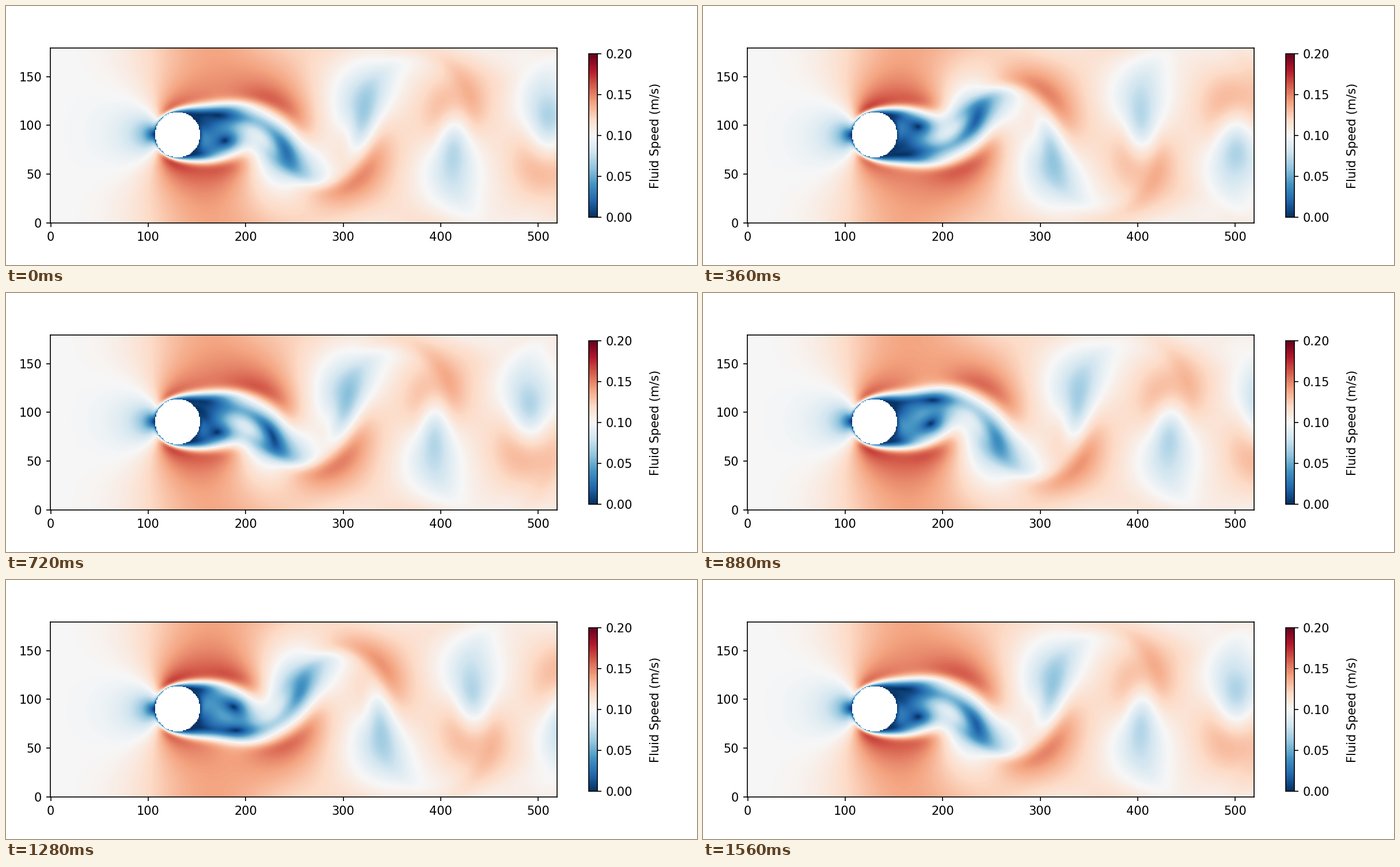
Recreate the animation shown at these times as a matplotlib script. Size 1200 by 450 pixels, loop 1.6 s.

```python
import numpy as np
import matplotlib.pyplot as plt
from matplotlib.animation import FuncAnimation

# Flow past a cylinder, solved with a regularised D2Q9 lattice Boltzmann scheme.
# The tunnel is periodic in y and runs on past the visible part.
WIDTH, HEIGHT, LENGTH = 520, 180, 600
CX, CY, RADIUS = 130, 90, 22.5
U0, VISCOSITY = 0.1, 1 / 30
INFLOW = 1.035 * U0          # offsets the back pressure of the cylinder
FRAMES, PERIOD, SUB = 40, 20, 4

DIRS = np.array([(0, 0), (1, 0), (-1, 0), (0, 1), (0, -1),
                 (1, 1), (-1, -1), (1, -1), (-1, 1)])
OPPOSITE = np.array([0, 2, 1, 4, 3, 6, 5, 8, 7])
# Moments: rho, jx, jy, sxx, syy, sxy
INLET = np.array([1, INFLOW, 0, INFLOW**2, 0, 0], np.float32)[:, None]


def cubic_weights(n_out, n_in, lift=0):
    x = (np.arange(n_out) + 0.5 - lift) * n_in / n_out - 0.5
    d = np.abs(x[:, None] - np.arange(n_in))
    near = 1.5 * d**3 - 2.5 * d**2 + 1
    far = -0.5 * d**3 + 2.5 * d**2 - 4 * d + 2
    w = np.where(d < 1, near, np.where(d < 2, far, 0))
    return w / w.sum(axis=1, keepdims=True)


def resample(field, ny, nx, lift=0):
    rows, cols = field.shape[-2:]
    return cubic_weights(ny, rows, lift) @ field @ cubic_weights(nx, cols).T


class Tunnel:
    def __init__(self, scale, fields):
        self.scale = scale
        nx, ny = int(LENGTH * scale) + 2, int(HEIGHT * scale) + 2
        n, pad = nx * ny, nx + 2
        self.omega = 1 / (0.5 + 3 * VISCOSITY * scale)

        x = (np.arange(nx) - 0.5) / scale - 0.5
        y = (np.arange(ny) - 0.5) / scale - 0.5
        solid = (x - CX)**2 + (y[:, None] - (HEIGHT - 1) / 2)**2 < RADIUS**2
        self.fluid = ~solid[1:-1, 1:-1]

        # Writing at an offset makes streaming free.
        shift = DIRS[:, 1] * nx + DIRS[:, 0]
        row = n + 2 * pad
        pops = np.zeros((9, row), np.float32)
        self.flat = pops.reshape(-1)
        self.read = [p[pad:pad + n] for p in pops]
        self.write = [p[pad + s:pad + s + n] for p, s in zip(pops, shift)]
        cells = np.flatnonzero(solid) + pad
        self.bounce_from = (OPPOSITE[:, None] * row + cells).ravel()
        self.bounce_to = ((np.arange(9) * row + shift)[:, None] + cells).ravel()

        self.m = np.zeros((6, ny, nx), np.float32)
        self.m[0] = 1
        self.rows = list(self.m.reshape(6, n))
        rho, u, v = resample(fields, ny - 2, nx - 2)
        u, v = u * self.fluid, v * self.fluid
        self.m[:, 1:-1, 1:-1] = (rho, rho * u, rho * v,
                                 rho * u * u, rho * v * v, rho * u * v)
        self.apply_edges()
        self.stream()

    def apply_edges(self):
        m = self.m
        m[:, :, 0] = INLET
        m[:, :, -1] = m[:, :, -2]
        m[0, :, -1] = 1
        m[:, 0] = m[:, -2]
        m[:, -1] = m[:, 1]

    def collide(self):
        f0, f1, f2, f3, f4, f5, f6, f7, f8 = self.read
        rho, jx, jy, sxx, syy, sxy = self.rows
        diag, anti = f5 + f6, f7 + f8
        ddiag, danti = f5 - f6, f7 - f8
        np.subtract(diag, anti, out=sxy)
        diag += anti
        np.add(f1, f2, out=sxx)
        sxx += diag
        np.add(f3, f4, out=syy)
        syy += diag
        np.add(f0, sxx, out=rho)
        rho += syy
        rho -= diag
        np.subtract(f1, f2, out=jx)
        jx += ddiag
        jx += danti
        np.subtract(f3, f4, out=jy)
        jy += ddiag
        jy -= danti

        keep = 1 - self.omega
        pressure = rho * (1 / 3)
        rate = self.omega / rho
        flux = rate * jx
        sxx -= pressure
        sxx *= keep
        sxx += flux * jx
        sxy *= keep
        sxy += flux * jy
        rate *= jy
        rate *= jy
        syy -= pressure
        syy *= keep
        syy += rate

    def stream(self):
        rho, jx, jy, sxx, syy, sxy = self.rows
        out = self.write

        def pair(i, even, odd):
            np.add(even, odd, out=out[i])
            np.subtract(even, odd, out=out[i + 1])

        trace = sxx + syy
        base = rho - 1.5 * trace
        np.multiply(base, 4 / 9, out=out[0])
        base *= 1 / 9
        pair(1, base + 0.5 * sxx, jx * (1 / 3))
        pair(3, base + 0.5 * syy, jy * (1 / 3))
        trace *= 3
        trace += rho
        trace *= 1 / 36
        shear = 0.25 * sxy
        pair(5, trace + shear, (jx + jy) * (1 / 12))
        pair(7, trace - shear, (jx - jy) * (1 / 12))

    def step(self, count=1):
        for _ in range(count):
            bounced = self.flat.take(self.bounce_from)
            self.collide()
            self.apply_edges()
            self.stream()
            self.flat[self.bounce_to] = bounced

    def fields(self):
        rho, jx, jy = self.m[:3, 1:-1, 1:-1]
        return np.array([rho, jx / rho * self.fluid, jy / rho * self.fluid])

    def speed(self):
        _, u, v = self.fields()
        return np.hypot(u, v)[:, :int(WIDTH * self.scale)]

    def half_period(self):
        """Run until the shedding is timed by sign changes in the wake."""
        guess = int(1000 * self.scale)
        changes, before = [-guess, 0], 0
        row, col = self.m.shape[1] // 2, int(260 * self.scale)
        for now in range(4 * guess):
            self.step()
            cross = self.m[2, row, col]
            if cross * before < 0 and now - changes[-1] > guess / 4:
                changes.append(now)
                if len(changes) == 5:
                    break
            before = cross
        return changes[-1] - changes[-2]


def initial_fields():
    y, x = np.mgrid[:HEIGHT:4, :LENGTH:4].astype(float)
    kick = 0.04 * np.exp(-((x - 220)**2 + (y - 90)**2) / 40**2)
    return np.array([np.ones_like(x), np.full_like(x, U0), kick])


def shedding_cycle():
    # Settle the wake on coarse grids, then record on a fine one.
    fields = initial_fields()
    for scale, steps in ((0.25, 7000), (0.5, 2000)):
        tunnel = Tunnel(scale, fields)
        tunnel.step(steps)
        fields = tunnel.fields()
    scale = 0.75
    tunnel = Tunnel(scale, fields)
    half = tunnel.half_period()

    count = PERIOD * SUB // 2
    marks = np.round(np.arange(count + 1) * half / count).astype(int)
    snaps = []
    for steps in np.diff(marks):
        snaps.append(tunnel.speed())
        tunnel.step(steps)
    snaps = np.array(snaps)
    # The second half of the cycle mirrors the first.
    cycle = np.concatenate([snaps, snaps[:, ::-1]])
    cycle *= U0 / cycle[:, :, 0].mean()

    # Start when the slow patch of the upper row passes x = 323.
    y0, y1, x0, x1 = (int(scale * k) for k in (105, 125, 317, 329))
    start = cycle[:, y0:y1, x0:x1].mean(axis=(1, 2)).argmin()
    chosen = np.roll(cycle, -start, axis=0)[::SUB]

    y, x = np.mgrid[:HEIGHT, :WIDTH]
    body = (x - CX)**2 + (y - CY)**2 < RADIUS**2
    lift = CY - (HEIGHT - 1) / 2
    return [np.ma.masked_where(body, resample(s, HEIGHT, WIDTH, lift).clip(0))
            for s in chosen]


def axes_px(fig, left, top, width, height):
    return fig.add_axes([left / 1200, 1 - (top + height) / 450,
                         width / 1200, height / 450])


cycle = shedding_cycle()

plt.rcParams["font.family"] = "DejaVu Sans"
fig = plt.figure(figsize=(8, 3), dpi=150, facecolor="white")
ax = axes_px(fig, 76.9, 72.63, 880.4, 304.75)
image = ax.imshow(cycle[0], origin="lower", aspect="auto",
                  cmap="RdBu_r", vmin=0, vmax=0.2)
ax.set_xticks(range(0, 501, 100))
ax.set_yticks(range(0, 151, 50))
bar = fig.colorbar(image, cax=axes_px(fig, 1012.3, 83, 14.4, 284),
                   ticks=[0, 0.05, 0.1, 0.15, 0.2])
bar.set_label("Fluid Speed (m/s)", labelpad=14.5)


def draw(frame):
    image.set_data(cycle[frame % PERIOD])
    return [image]


anim = FuncAnimation(fig, draw, frames=FRAMES, interval=40, repeat=True)
plt.show()
```
